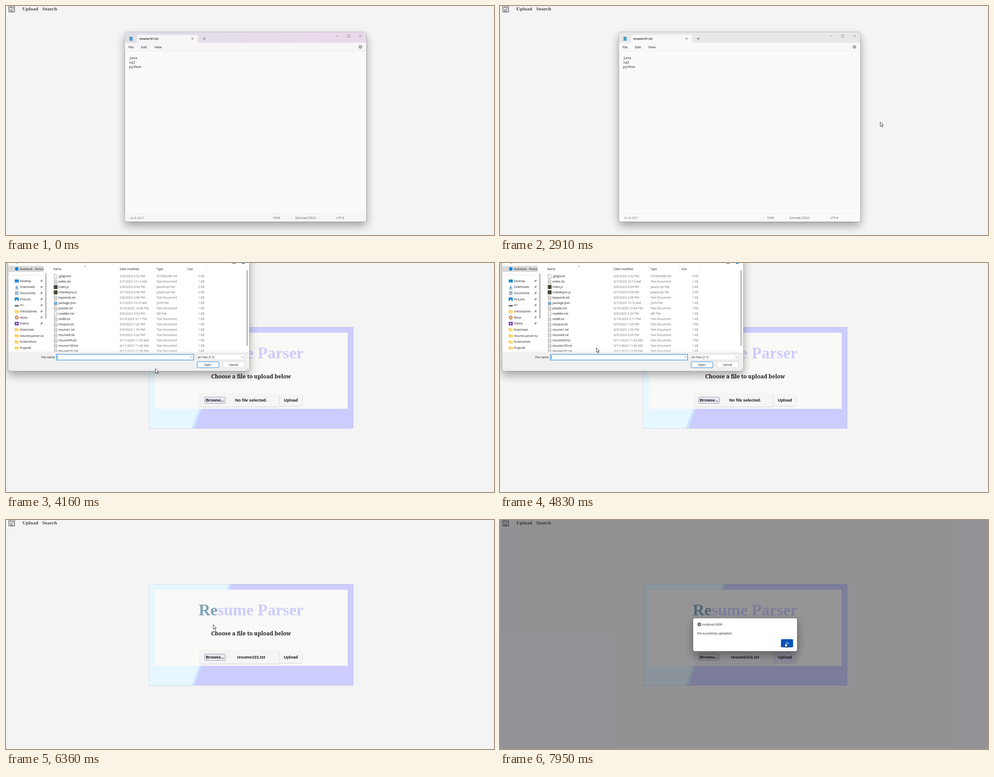
Write an HTML page that moves like this. It is 1089 by 514 pixels and loops after 8 s.

```html
<!DOCTYPE html>
<html lang="en">
<head>
<meta charset="utf-8">
<title>Resume Parser</title>
<style>
  html, body { margin: 0; width: 100%; height: 100%; overflow: hidden; background: #f4f4f4; }
  svg { display: block; width: 1089px; height: 514px; }
  text { font: 6.5px "Open Sans", sans-serif; fill: #1a1a1a; white-space: pre; }
  .menu { font-size: 7.5px; }
  .tab { font-size: 6.2px; font-weight: 600; }
  .code { font: 7.5px "Noto Sans Mono", monospace; }
  .nav { font: bold 11.3px "Liberation Serif", serif; fill: #484848; }
  .title { font: bold 36.2px "Liberation Serif", serif; fill: url(#ink); text-anchor: middle; }
  .sub { font: bold 12.1px "Noto Serif", serif; text-anchor: middle; }
  .form { font: bold 9.3px "Liberation Sans", sans-serif; fill: #15141a; text-anchor: middle; }
  .mid { text-anchor: middle; }
  .end { text-anchor: end; }
  .dim { fill: #6d6d6d; }
  .date { font-size: 6.9px; }
  .status { fill: #5c5c5c; }
  .line { fill: none; stroke: #444; stroke-width: .8; }
  .soft { filter: drop-shadow(0 1px 1.5px rgba(0,0,0,.16)); }
  .window { filter: drop-shadow(0 9px 10px rgba(0,0,0,.24)) drop-shadow(0 0 1px rgba(0,0,0,.5)); }
</style>
</head>
<body>
<svg viewBox="0 0 1089 514">
  <defs>
    <linearGradient id="ink" gradientUnits="userSpaceOnUse" x1="430" x2="664" y1="0" y2="0">
      <stop offset=".175" stop-color="#80a3b8"/><stop offset=".175" stop-color="#ccccff"/>
    </linearGradient>
    <linearGradient id="mica"><stop stop-color="#e1dfe8"/><stop offset=".5" stop-color="#e6dce9"/><stop offset="1" stop-color="#e9d9ea"/></linearGradient>
    <clipPath id="rowsClip"><path d="M94 19.5H536V199H94Z"/></clipPath>
    <clipPath id="sideClip"><path d="M5 0H84V199H5Z"/></clipPath>
    <clipPath id="winClip"><rect x="265.5" y="59" width="538.5" height="425" rx="4.5"/></clipPath>
  </defs>

  <g id="page">
    <rect width="1089" height="514" fill="#f4f4f4"/>
    <g fill="none" stroke="#42424a">
      <path d="M6.5 -2V13.5H19V-2" stroke-width="1.2"/>
      <path d="M8.7 5L10.8 -1L13 5M9.5 3.2H12.2M14 1H17M14 3H17M14 5H17M9 8H17M9 10H14M9 12H17" stroke-width=".9"/>
    </g>
    <text class="nav" x="36.6" y="10">Upload</text>
    <text class="nav" x="81" y="10">Search</text>
    <path fill="#ccccff" d="M319 144H775V371.5H319Z"/>
    <path fill="#cce6ff" d="M319 144H503L420 371.5H319Z"/>
    <path fill="#e6f7ff" d="M319 144H497.5L414.500 371.5H319Z"/>
    <path fill="none" stroke="#888" stroke-opacity=".22" d="M319.5 144.500H774.5V371H319.500Z"/>
    <path fill="#f9f9f7" d="M332 156.500H762.5V327.300H332Z"/>
    <text class="title" x="547" y="214">Resume Parser</text>
    <text class="sub" x="547" y="259">Choose a file to upload below</text>
    <rect id="row" class="soft" x="433.500" y="293.500" width="177" height="28.500" rx="3"/>
    <rect id="browse" x="443" y="300.800" width="46.500" height="14.400" rx="2" stroke-width=".9"/>
    <text class="form" x="466.300" y="311.300">Browse...</text>
    <text class="form" id="chosen" x="547" y="311.300"></text>
    <rect id="upload" class="soft" x="611" y="295.500" width="49.500" height="25" rx="3"/>
    <text class="form" x="635.700" y="311.300">Upload</text>
  </g>

  <g id="notepad">
    <rect class="window" x="265.500" y="59" width="538.500" height="425" rx="4.500" fill="#fafafa"/>
    <g clip-path="url(#winClip)">
      <path fill="#e8e8e8" d="M265 58H805V83H265Z"/>
      <path fill="#f9f9f9" d="M265 82.500H805V101H265ZM292.500 83V69Q292.500 65 296.500 65H424.500Q428.500 65 428.500 69V83Z"/>
      <g id="tint">
        <path fill="url(#mica)" d="M265 58H805V83H265Z"/>
        <path fill="#f8f5f9" d="M265 82.500H805V101H265ZM292.500 83V69Q292.500 65 296.500 65H424.500Q428.500 65 428.500 69V83ZM265 466H805V485H265Z"/>
      </g>
      <path stroke="#e6e6e6" stroke-width=".8" d="M265 101H805M265 466H805M588.500 471V481M639.500 471V481M730.500 471V481"/>
    </g>
    <rect x="275.500" y="69" width="7" height="9" fill="#4a9fc4"/>
    <text class="tab" x="297.300" y="76.300">resume101.txt</text>
    <path class="line" d="M414 71L418.500 75.500M418.500 71L414 75.500M439.500 73.500H445.500M442.500 70.500V76.500"/>
    <path class="line" style="stroke:#777" d="M736.500 67.500H742M762.300 64.800H767.500V70H762.300ZM788.300 64.700L793.500 70M793.500 64.700L788.300 70"/>
    <circle class="line" cx="790.800" cy="91.800" r="3.300" stroke-dasharray="2.6 .85" style="stroke-width:1.1"/>
    <circle class="line" cx="790.800" cy="91.800" r="1.300"/>
    <text class="menu" x="273.300" y="95">File</text>
    <text class="menu" x="301.300" y="95">Edit</text>
    <text class="menu" x="331" y="95">View</text>
    <text class="code" x="274.800" y="118.500">java</text>
    <text class="code" x="274.800" y="128.700">sql</text>
    <text class="code" x="274.800" y="139">python</text>
    <text class="status" x="277.700" y="478.300">Ln 4, Col 1</text>
    <text class="status" x="595" y="478.300">100%</text>
    <text class="status" x="645.500" y="478.300">Grenvak (CRLF)</text>
    <text class="status" x="737" y="478.300">UTF-8</text>
  </g>

  <g id="dialog">
    <path class="window" fill="#f0f0f0" d="M5 -20H543V237.500Q543 242.500 538 242.500H10Q5 242.500 5 237.500Z"/>
    <path fill="#fff" d="M5.500 0H542.500V199H5.500Z"/>
    <path fill="#d9d9d9" d="M6 6.500H84V20H6Z"/>
    <path stroke="#ddd" stroke-width=".8" d="M10 27H80M250.500 6V20M332.500 6V20M401.500 6V20M447 6V20"/>
    <path stroke="#868686" stroke-width="1.600" d="M89 23.500V125"/>
    <path fill="#333" d="M505 0H513V1H505ZM23 0H26V.8H23Z"/>
    <circle cx="529.500" cy="-2" r="4" fill="#1679d0"/>
    <path class="line" d="M174.300 8.800L176.500 6.700L178.700 8.800"/>
    <g id="side" clip-path="url(#sideClip)"></g>
    <text x="105.500" y="16">Name</text><text x="254" y="16">Date modified</text>
    <text x="336" y="16">Type</text><text x="405" y="16">Size</text>
    <g clip-path="url(#rowsClip)"><g id="files"></g></g>
    <path id="thumb" stroke="#868686" stroke-width="1.600" d="M538 16V186"/>
    <text class="end" x="109.800" y="213.500">File name:</text>
    <rect id="field" x="112.500" y="205" width="306" height="12.800" fill="#fff"/>
    <text id="typed" x="114" y="213.700">resume101.txt</text>
    <path id="caret" stroke="#222" stroke-width=".8" d="M115 207V216"/>
    <rect x="426" y="205" width="106.500" height="12.800" fill="#fff" stroke="#ccc" stroke-width=".8"/>
    <text x="428" y="213.500">All Files (*.*)</text>
    <path class="line" d="M411 210L413.500 212.500L416 210M525 210L527.500 212.500L530 210"/>
    <rect x="426.500" y="221.700" width="48.500" height="13.300" rx="2" fill="#fdfdfd" stroke="#0078d4" stroke-width=".9"/>
    <rect x="483.500" y="221.700" width="48.500" height="13.300" rx="2" fill="#fdfdfd" stroke="#d0d0d0" stroke-width=".8"/>
    <text class="mid" x="450.600" y="230.600">Open</text>
    <text class="mid" x="507.700" y="230.600">Cancel</text>
    <path stroke="#aaa" stroke-width=".7" d="M536 241L541 236M538.500 241L541 238.500"/>
  </g>

  <g id="alert">
    <rect width="1089" height="514" fill="#1c1b22" fill-opacity=".45"/>
    <rect class="window" x="431" y="220.500" width="232" height="74" rx="4" fill="#fff"/>
    <g class="line" style="stroke:#222">
      <circle cx="444.800" cy="234.300" r="3.900"/><ellipse cx="444.800" cy="234.300" rx="1.700" ry="3.900"/>
      <path d="M441 233H448.600M441 235.700H448.600"/>
    </g>
    <text x="451" y="236.800" style="font-size:6.7px">localhost:3000</text>
    <text x="440" y="256.700">File succesfully uploaded!</text>
    <rect id="ok" x="627" y="267.500" width="27" height="18.300" rx="2"/>
    <text class="mid" x="640.500" y="279.200" style="fill:#fff">OK</text>
  </g>

  <g id="cursor">
    <circle id="click" r="6.500" cy="1.500" fill="#f4f000" fill-opacity=".65"/>
    <path id="arrow" d="M0 0V10.300L2.300 8.200L3.900 11.800L5.500 11.100L3.900 7.600H7Z" fill="#fff" stroke="#111" stroke-width=".8"/>
    <path id="hand" d="M-1 1Q0-.8 1 1V5.200L2.700 5L5 5.700L6.200 6.700V10L5 14H-.800L-4 9.500Q-4 7.600-2.300 8.400L-1 9.600ZM2.700 5V7.500M5 5.700V8" fill="#fff" stroke="#111" stroke-width=".8"/>
    <path id="beam" d="M-2-5.200H2M0-5.200V5.200M-2 5.200H2" fill="none" stroke="#333" stroke-width=".8"/>
    <path id="resize" d="M-5-1.500V-5H-1.500L-2.700-3.800L3.800 2.700L5 1.500V5H1.500L2.700 3.800L-3.800-2.700Z" fill="#fff" stroke="#111" stroke-width=".8"/>
  </g>
</svg>
<script>
const $ = id => document.getElementById(id);
const show = (id, on) => { $(id).style.display = on ? '' : 'none'; };
const paint = (id, fill, stroke = 'none') => { $(id).style.fill = fill; $(id).style.stroke = stroke; };
const text = (s, x, y, cls = '') => `<text class="${cls}" x="${x}" y="${y}">${s}</text>`;
const LOOP = 8000, LAST_ROW = 14;

// Sidebar entries
const folder = '<path fill="#f5bd45" d="M-4.500-3H-1L0-2H4.500V3.500H-4.500Z"/><path fill="#ffd873" d="M-4.500-1H4.500V3.500H-4.500Z"/>';
const icons = {
  Desktop: '<path fill="#1683cf" d="M-4.500-3.500H4.500V3.500H-4.500Z"/><path fill="#6fd0f5" d="M-3.500 1H1V2.500H-3.500Z"/>',
  Downloads: '<path fill="none" stroke="#2383b8" stroke-width="1.200" d="M0-4V2M-3-.5L0 2.300L3-.5M-3.500 4.200H3.500"/>',
  Documents: '<path fill="#7c9cb8" d="M-3.500-4H3.500V4H-3.500Z"/><path stroke="#fff" stroke-width=".8" d="M-2-1.500H2M-2 .5H2M-2 2.500H2"/>',
  Pictures: '<path fill="#1683cf" d="M-4.500-4H4.500V4H-4.500Z"/><path fill="#fff" d="M-3.500 4L0 0L3.500 4Z"/>',
  'H:\\': '<path fill="#555" d="M-4.500 0H4.500V2.500H-4.500Z"/><path fill="#bbb" d="M-3.500-1.500H3.500L4.500 0H-4.500Z"/>',
  Music: '<circle r="4.300" fill="#d48a5d"/><circle r="1.500" fill="#fff"/>',
  Videos: '<path fill="#7646b8" d="M-4.500-4H4.500V4H-4.500Z"/><path fill="#fff" d="M-1.500-2L2 0L-1.500 2Z"/>'
};
const pin = '<path transform="translate(79 0) rotate(40)" fill="#8a8a8a" d="M-1.500-3H1.500V0L2.500 1H.4V3.500H-.4V1H-2.500L-1.500 0Z"/>';
const places = ['Desktop', 'Downloads', 'Documents', 'Pictures', 'H:\\', 'chessGames', 'Music', 'Videos',
  'Download', 'resume-parser-back', 'Screenshots', 'Project8'];
$('side').innerHTML = '<circle cx="24" cy="13.300" r="4" fill="#1683d8"/>' + text('NubVault - Personal', 31, 15.500) +
  places.map((name, i) => `<g transform="translate(0 ${40.500 + i * 13.640})"><g transform="translate(24 0)">${icons[name] || folder}</g>` +
    text(name, 31, 2.300) + (i < 8 ? pin : '') + '</g>').join('');

// File list: name, day in June, time
const files = `.gitignore 8 3:32 PM|exRes.txt 7 10:12 AM|index.js 8 4:34 PM|indexAsync.js 7 9:38 PM|keywords.txt 8 3:38 PM
|package.json 7 10:10 AM|phpdev.txt 10 10:44 PM|readMe.md 8 3:33 PM|res88.txt 10 5:11 PM|rescjava.txt 9 1:26 PM|resume1.txt 9 1:39 PM
|resume8.txt 9 3:26 PM|resume99.txt 11 11:33 AM|resume100.txt 11 11:42 AM|resume101.txt 11 12:06 PM`.split('|');
const kinds = { gitignore: 'GITIGNORE File', js: 'JavaScript File', json: 'JSON File', md: 'MD File', txt: 'Text Document' };
const sheet = '<path fill="#fff" stroke="#8c8c8c" stroke-width=".8" d="M107.500-4.500H112L114-2.500V4.500H107.500Z"/>';
const badges = {
  js: '<path fill="#4b4534" d="M106.500-4.500H115V4.500H106.500Z"/>',
  json: sheet + '<path fill="#60aee0" d="M108-2H114V4H108Z"/>',
  txt: sheet + '<path stroke="#999" stroke-width=".7" d="M108.500-2H113M108.500-.5H113M108.500 1H113M108.500 2.500H113"/>',
  md: sheet + '<path stroke="#bbb" stroke-width=".7" d="M109-.5H113M109 1.500H113"/>'
};
$('files').innerHTML = files.map((entry, i) => {
  const [name, day, time, half] = entry.trim().split(' '), ext = name.split('.').pop();
  const mark = i === LAST_ROW ? '<rect id="picked" x="104" y="-5.700" width="340.500" height="11.600" fill="#cce8ff" stroke="#99d1ff" stroke-width=".7"/>' : '';
  return `<g transform="translate(0 ${30 + i * 11.970})">${mark}${badges[ext] || sheet}` + text(name, 117, 2.400) +
    text(`6/${day}/2023 ${time} ${half}`, 254, 2.400, 'dim date') + text(kinds[ext], 336, 2.400, 'dim') +
    text(`${i ? ext === 'js' ? 2 : 1 : 0} KB`, 442.500, 2.400, 'dim end') + '</g>';
}).join('');

// Pointer path: time, x, y
const path = [[390, 965, 474], [660, 638.5, 331], [1120, 638.5, 331], [1250, 638.5, 329.5], [1390, 638.5, 329.5],
  [1660, 865.5, 248.5], [2050, 865.5, 248.5], [2180, 851.5, 258.5], [2440, 851.5, 258.5], [2580, 848.5, 260],
  [3110, 848.5, 260], [3640, 482, 308], [3900, 482, 308], [4160, 333.5, 237], [4230, 333.5, 237], [4760, 215, 190],
  [5100, 215, 192], [5430, 556, 235], [5560, 541.5, 241.5], [5750, 541.5, 241.5], [6100, 455, 229],
  [6250, 455, 229], [6500, 473, 243], [6560, 473, 243], [6960, 630, 309.5], [7680, 630, 309.5], [7950, 636, 275.5]];
const clicks = [[3770, 3900], [5000, 5090], [6140, 6240], [7160, 7420]];

function pointer(t) {
  const i = path.findIndex(p => p[0] > t);
  if (i < 1) return path[i < 0 ? path.length - 1 : 0].slice(1);
  const [t0, x0, y0] = path[i - 1], [t1, x1, y1] = path[i];
  const u = (t - t0) / (t1 - t0), k = u * u * (3 - 2 * u);
  return [x0 + (x1 - x0) * k, y0 + (y1 - y0) * k];
}

function draw(t) {
  const [x, y] = pointer(t);
  const within = (l, top, r, b) => x > l && x < r && y > top && y < b;
  const notepad = t < 2940, dialog = t >= 4000 && t < 6290, alert = t >= 7420;
  const free = !notepad && !dialog;
  const overRow = free && within(433, 293, 611, 322), overUpload = free && (alert || within(611, 295, 661, 321));
  const overBrowse = overRow && within(443, 300, 490, 316);

  show('notepad', notepad);
  $('tint').style.opacity = t < 70 ? 1 : t < 130 ? .5 : 0;
  paint('row', overRow ? '#e6e6fa' : '#f5f5f7');
  paint('browse', overBrowse ? '#d0d0d7' : '#e9e9ed', overBrowse ? '#676774' : '#8f8f9d');
  paint('upload', overUpload ? '#e6e6fa' : '#f6f6f8');
  $('chosen').textContent = t < 6360 ? 'No file selected.' : 'resume101.txt';

  show('dialog', dialog);
  const scroll = Math.min(1, Math.max(0, (t - 4830) / 70)), picked = t >= 5030;
  $('files').setAttribute('transform', `translate(0 ${-4.700 * scroll})`);
  $('thumb').setAttribute('transform', `translate(0 ${3.500 * scroll})`);
  show('picked', picked);
  show('typed', picked);
  show('caret', !picked);
  paint('field', '#fff', picked ? '#8a9199' : '#0078d4');

  show('alert', alert);
  paint('ok', within(627, 267, 654, 286) ? '#0250bb' : '#0060df');

  const kind = notepad && within(266, 101, 804, 466) ? 'beam'
    : dialog && within(538, 238, 546, 246) ? 'resize'
    : !alert && (overRow || overUpload) ? 'hand' : 'arrow';
  for (const id of ['arrow', 'hand', 'beam', 'resize']) show(id, id === kind);
  show('click', clicks.some(([a, b]) => t >= a && t < b));
  show('cursor', t >= 390);
  $('cursor').setAttribute('transform', `translate(${x} ${y})`);
}

const start = performance.now();
(function tick() {
  draw((performance.now() - start) % LOOP);
  requestAnimationFrame(tick);
})();
</script>
</body>
</html>
```
